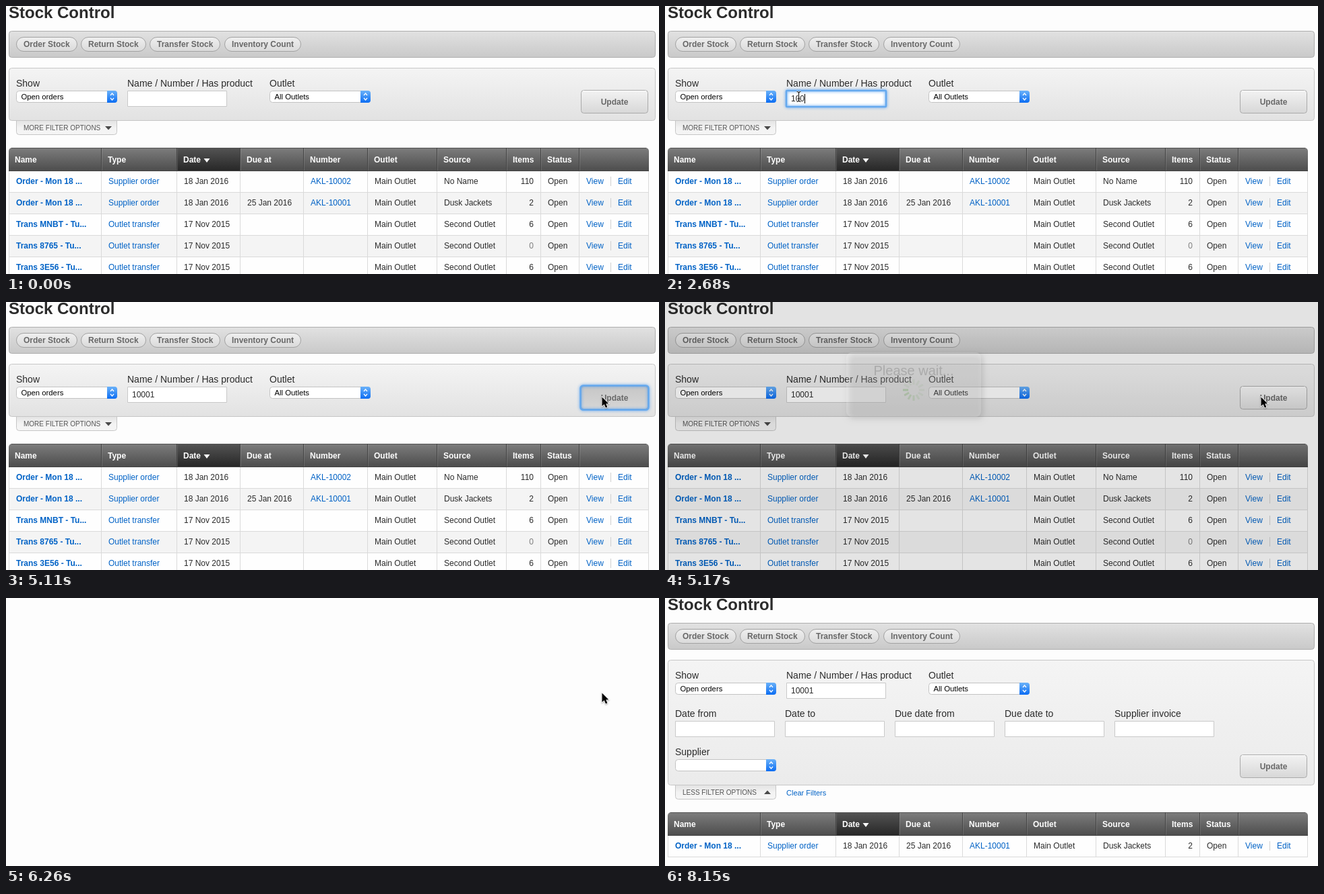
An HTML page with a canvas that plays this animation: 969 by 399 pixels, repeating every 8.95 s.

```html
<!DOCTYPE html>
<html lang="en">
<head>
<meta charset="utf-8">
<title>Stock Control</title>
<style>
  html, body { margin: 0; width: 100%; height: 100%; overflow: hidden; background: #fdfdfd; }
  canvas { display: block; }
</style>
</head>
<body>
<canvas id="stage" width="969" height="399"></canvas>
<script>
const LOOP = 8950, W = 969, H = 399;
const g = document.getElementById('stage').getContext('2d');
const FONT = '"Liberation Sans", Arial, sans-serif';
const INK = '#2b2b2b', LINK = '#0062c6';

const COLS = [4, 141, 253, 347, 441, 536, 639, 742, 793, 850, 953];
const HEADS = ['Name', 'Type', 'Date', 'Due at', 'Number', 'Outlet', 'Source', 'Items', 'Status'];
const ROWS = [
  ['Order - Mon 18 ...', 'Supplier order', '18 Jan 2016', '', 'AKL-10002', 'Main Outlet', 'No Name', '110', 'Open'],
  ['Order - Mon 18 ...', 'Supplier order', '18 Jan 2016', '25 Jan 2016', 'AKL-10001', 'Main Outlet', 'Dusk Jackets', '2', 'Open'],
  ['Trans MNBT - Tu...', 'Outlet transfer', '17 Nov 2015', '', '', 'Main Outlet', 'Second Outlet', '6', 'Open'],
  ['Trans 8765 - Tu...', 'Outlet transfer', '17 Nov 2015', '', '', 'Main Outlet', 'Second Outlet', '0', 'Open'],
  ['Trans 3E56 - Tu...', 'Outlet transfer', '17 Nov 2015', '', '', 'Main Outlet', 'Second Outlet', '6', 'Open']
];
const KEYS = [2090, 2390, 2680, 3270, 3690];

function text(s, x, y, size = 12, color = INK, bold = false, align = 'left') {
  g.font = `${bold ? 'bold ' : ''}${size}px ${FONT}`;
  g.textAlign = align;
  g.fillStyle = color;
  g.fillText(s, x, y);
}

function shade(y, h, ...colors) {
  const grad = g.createLinearGradient(0, y, 0, y + h);
  colors.forEach((c, i) => grad.addColorStop(i / (colors.length - 1), c));
  return grad;
}

function box(x, y, w, h, r, fill, stroke) {
  g.beginPath();
  g.roundRect(x + .5, y + .5, w - 1, h - 1, r);
  g.fillStyle = fill;
  g.fill();
  g.strokeStyle = stroke;
  g.lineWidth = 1;
  g.stroke();
}

function poly(points, fill) {
  g.beginPath();
  points.forEach(([x, y]) => g.lineTo(x, y));
  g.closePath();
  g.fillStyle = fill;
  g.fill();
}

function rect(x, y, w, h, fill) {
  g.fillStyle = fill;
  g.fillRect(x, y, w, h);
}

function glow(x, y, w, h, r) {
  g.save();
  g.shadowColor = '#4f9cf0';
  g.shadowBlur = 4;
  g.strokeStyle = '#65a9ee';
  g.lineWidth = 2.5;
  g.beginPath();
  g.roundRect(x, y, w, h, r);
  g.stroke();
  g.restore();
}

function pill(label, x, w) {
  box(x, 46, w, 22, 11, shade(46, 22, '#f0f0f0', '#d9d9d9'), '#a2a2a2');
  text(label, x + 11, 61, 12, '#686868', true);
}

function select(label, x, y) {
  box(x, y, 150, 18, 4, '#fff', '#c3c3c3');
  g.beginPath();
  g.roundRect(x + 135, y, 15, 18, [0, 4, 4, 0]);
  g.fillStyle = shade(y, 18, '#6bb2f9', '#0b6df3');
  g.fill();
  g.strokeStyle = '#fff';
  g.lineWidth = 1.3;
  g.beginPath();
  for (const d of [-1, 1]) {
    const m = y + 9 + d * 2;
    g.moveTo(x + 140, m);
    g.lineTo(x + 142.5, m + d * 3);
    g.lineTo(x + 145, m);
  }
  g.stroke();
  text(label, x + 7.5, y + 13, 11.3, '#000');
}

function field(x, y) {
  box(x, y, 148, 24, 0, '#fff', '#c9c9c9');
}

function updateButton(y, hover, pressed) {
  const fill = pressed ? shade(y, 35, '#c6c6c6', '#d6d6d6')
    : hover ? shade(y, 35, '#f8f8f8', '#dcdcdc')
    : shade(y, 35, '#f3f3f3', '#d7d7d7');
  box(853, y, 100, 35, 4, fill, '#aaa');
  if (!pressed) rect(856, y + 1, 94, 1, '#fff');
  text('Update', 903, y + 22, 12, '#686868', true, 'center');
}

function table(top, rows) {
  g.beginPath();
  g.roundRect(4, top, 950, 35, [5, 5, 0, 0]);
  g.fillStyle = shade(top, 35, '#7d7d7d', '#4c4c4c');
  g.fill();
  rect(253, top, 95, 35, shade(top, 35, '#545454', '#262626'));
  rect(8, top, 942, 1, '#555');
  rect(4, top + 34, 950, 1, '#444');
  COLS.slice(1, -1).forEach(x => {
    rect(x, top, 1, 35, '#444');
    rect(x + 1, top + 1, 1, 33, 'rgba(255,255,255,.13)');
  });
  HEADS.forEach((s, i) => text(s, COLS[i] + (i ? 10 : 9), top + 22, 12, '#fff', true));
  poly([[293.5, top + 16], [302.5, top + 16], [298, top + 22]], '#fff');

  rows.forEach((row, n) => {
    const y = top + 35 + n * 32, base = y + 19;
    rect(4, y, 950, 32, n % 2 ? '#f4f4f4' : '#fefefe');
    rect(4, y + 31, 950, 1, '#dadada');
    COLS.forEach(x => rect(x, y, 1, 32, '#dadada'));
    row.forEach((s, i) => {
      if (i === 7) text(s, 783, base, 12, s === '0' ? '#808080' : INK, false, 'right');
      else text(s, COLS[i] + 11, base, 12, [0, 1, 4].includes(i) ? LINK : INK, i === 0);
    });
    text('View', 861, base, 12, LINK);
    text('Edit', 908, base, 12, LINK);
    rect(897, y + 8, 1, 14, '#d0d0d0');
  });
}

function filterTab(y, label, arrow) {
  g.beginPath();
  g.roundRect(15.5, y - .5, 149, 21, [0, 0, 4, 4]);
  g.fillStyle = shade(y, 21, '#e4e4e4', '#f3f3f3', '#f5f5f5');
  g.fill();
  g.strokeStyle = '#c6c6c6';
  g.lineWidth = 1;
  g.stroke();
  text(label, 26, y + 14, 10, '#555');
  const m = y + 10.5;
  if (arrow) poly([[147, m - arrow * 2.5], [157, m - arrow * 2.5], [152, m + arrow * 3]], '#4a4a4a');
}

function typed(t) {
  return '10001'.slice(0, KEYS.filter(k => t >= k).length);
}

function caretOn(t) {
  const last = [1250, ...KEYS].filter(k => t >= k).pop();
  const blink = last === 2680 ? 480 : 520;
  return Math.floor((t - last) / blink) % 2 === 0;
}

function page(t, pos) {
  const full = t >= 7220;
  const panelH = full ? 187 : 79;
  const end = 92 + panelH;
  text('Stock Control', 4, 18, 24, INK, true);
  box(4, 37, 960, 40, 4, shade(37, 40, '#e2e2e2', '#d5d5d5', '#c9c9c9'), '#adadad');
  pill('Order Stock', 15, 91);
  pill('Return Stock', 111, 97);
  pill('Transfer Stock', 213, 105);
  pill('Inventory Count', 324, 114);

  filterTab(end, full ? 'LESS FILTER OPTIONS' : 'MORE FILTER OPTIONS', full ? (t >= 7310 ? -1 : 0) : 1);
  box(4, 92, 960, panelH, 4, shade(92, panelH, '#f4f4f4', full ? '#ebebeb' : '#e2e2e2'), '#c6c6c6');
  text('Show', 15, 120, 14);
  text('Name / Number / Has product', 180, 120, 14);
  text('Outlet', 391, 120, 14);
  select('Open orders', 15, 126);
  select('All Outlets', 391, 126);
  field(180, 126);
  const focused = t >= 1250 && t < 4990;
  if (focused) glow(180, 126, 148, 24, 1);
  const value = typed(t);
  text(value, 187, 142);
  if (focused && caretOn(t)) rect(187 + Math.round(value.length * 6.67), 131, 1, 14, '#000');

  if (full) {
    ['Date from', 'Date to', 'Due date from', 'Due date to', 'Supplier invoice'].forEach((s, i) => {
      const x = 15 + i * 163;
      text(s, x, 177, 14);
      field(x, 183);
    });
    text('Supplier', 15, 234, 14);
    select('', 15, 240);
    text('Clear Filters', 180, 294, 11, LINK);
  }
  const by = full ? 233 : 125;
  const hover = !full && pos && pos[0] > 853 && pos[1] > 125;
  const pressed = t >= 4990 && t < 5170;
  updateButton(by, hover, pressed);
  if (pressed) glow(852.5, 124.5, 101, 36, 4);
  table(full ? 319 : 211, full ? [ROWS[1]] : ROWS);
}

function waitBox(level) {
  rect(0, 0, W, H, `rgba(0,0,0,${level * .5})`);
  g.save();
  g.globalAlpha = level;
  g.shadowColor = 'rgba(0,0,0,.65)';
  g.shadowBlur = 8;
  g.shadowOffsetX = g.shadowOffsetY = 3;
  g.beginPath();
  g.roundRect(269, 75, 200, 96, 8);
  g.fillStyle = '#fefefe';
  g.fill();
  g.shadowColor = 'transparent';
  text('Please wait...', 369, 109, 20, INK, false, 'center');
  g.translate(369, 131);
  g.rotate(Math.PI);
  g.lineWidth = 3;
  for (let i = 0; i < 12; i++) {
    const k = Math.max(.28, 1 - i * .14);
    g.strokeStyle = `rgba(38,135,8,${k})`;
    g.beginPath();
    g.moveTo(8, 0);
    g.lineTo(16, 0);
    g.stroke();
    g.rotate(-Math.PI / 6);
  }
  g.restore();
}

// Progress of a move whose pointer is sampled in even steps.
function progress(t, from, to, steps) {
  const k = Math.floor((t - from) / (to - from) * (steps - 1) + 1e-6) / (steps - 1);
  return Math.max(0, Math.min(1, k));
}

function curve(a, c, b, k) {
  const u = 1 - k;
  return [0, 1].map(i => u * u * a[i] + 2 * u * k * c[i] + k * k * b[i]);
}

const smooth = k => k * k * (3 - 2 * k);

function pointer(t) {
  if (t < 410 || t >= 8150) return null;
  if (t < 4110) {
    const k = progress(t, 410, 1070, 12);
    return curve([4, 283], [90, 175], [198, 135], 1 - (1 - k) ** 2);
  }
  if (t < 7460) return curve([198, 135], [540, 86], [884, 141], smooth(progress(t, 4110, 4810, 12)));
  const k = progress(t, 7400, 8150, 14);
  return curve([884, 141], [945, 215], [966, 399], k ** 1.5);
}

function arrow(x, y) {
  g.save();
  g.translate(Math.round(x), Math.round(y));
  g.beginPath();
  [[.5, .5], [.5, 14], [3.7, 11.2], [6, 16.4], [8.4, 15.3], [6.2, 10.4], [10.2, 10.2]].forEach(([a, b]) => g.lineTo(a, b));
  g.closePath();
  g.shadowColor = 'rgba(0,0,0,.35)';
  g.shadowBlur = 2;
  g.shadowOffsetY = 1;
  g.strokeStyle = '#fff';
  g.lineWidth = 1.6;
  g.stroke();
  g.shadowColor = 'transparent';
  g.fillStyle = '#000';
  g.fill();
  g.restore();
}

function beam(x, y) {
  g.save();
  g.translate(Math.round(x) + .5, Math.round(y));
  g.beginPath();
  for (const d of [-1, 1]) {
    g.moveTo(-3, d * 7.5);
    g.quadraticCurveTo(0, d * 7.5, 0, d * 5);
    g.quadraticCurveTo(0, d * 7.5, 3, d * 7.5);
  }
  g.moveTo(0, -6);
  g.lineTo(0, 6);
  g.moveTo(-2, 3);
  g.lineTo(2, 3);
  for (const [color, width] of [['rgba(255,255,255,.8)', 2.6], ['#111', 1.1]]) {
    g.strokeStyle = color;
    g.lineWidth = width;
    g.stroke();
  }
  g.restore();
}

function draw(t) {
  const pos = pointer(t);
  rect(0, 0, W, H, '#fdfdfd');
  if (t < 6260 || t >= 7220) page(t, pos);
  if (t >= 5170 && t < 6260) waitBox(Math.min(5, Math.floor((t - 5170) / 80) + 1) / 5);
  if (!pos) return;
  const [x, y] = pos;
  const overField = x > 180 && x < 328 && y > 126 && y < 150;
  (overField ? beam : arrow)(x, y);
}

const start = performance.now();
function tick() {
  draw((performance.now() - start) % LOOP);
  requestAnimationFrame(tick);
}
tick();
</script>
</body>
</html>
```
